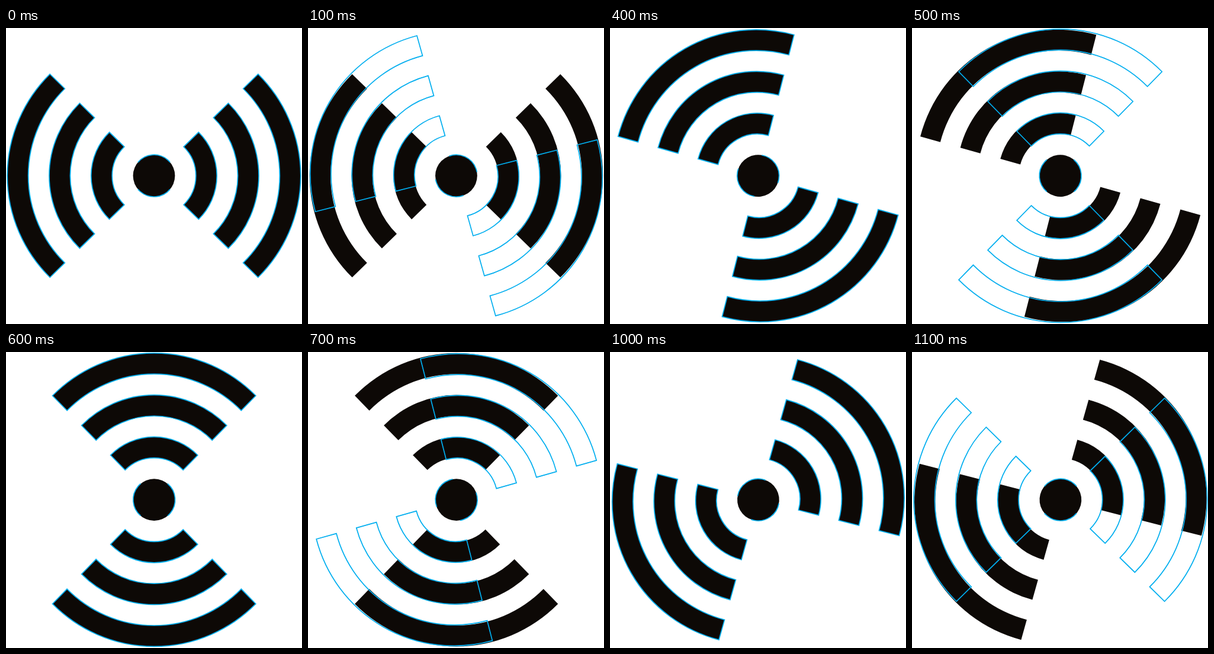
An HTML page with a canvas for the animation above (1.2 s loop, 500 px wide and 500 px high).

```html
<!DOCTYPE html>
<html lang="en">
<head>
<meta charset="utf-8">
<title>Rotating signal</title>
<style>
  html, body { margin: 0; width: 100%; height: 100%; overflow: hidden; background: #fff; }
  canvas { display: block; width: 500px; height: 500px; }
</style>
</head>
<body>
<canvas id="stage" width="500" height="500"></canvas>
<script>
const ctx = document.getElementById('stage').getContext('2d');
const LOOP = 1200, STEP = 100;
const UNIT = 35.4;                  // width of one band and of one gap
const SQUASH = 0.983;               // the bands are slightly flattened
const HALF = 44.8 * Math.PI / 180;  // half the angle of a band
const CAP = 50 * Math.PI / 180;     // half the angle of the dot's outline

const bands = new Path2D();
for (const mid of [0, Math.PI]) {
  for (const n of [2, 4, 6]) {
    const band = new Path2D();
    const edge = (r, from, to, back) =>
      band.ellipse(0, 0, r, r * SQUASH, 0, mid + from, mid + to, back);
    edge((n + 1) * UNIT, -HALF, HALF, false);
    edge(n * UNIT, HALF, -HALF, true);
    band.closePath();
    bands.addPath(band);
  }
}

const dot = new Path2D();
dot.arc(0, 0, UNIT, 0, Math.PI * 2);

const dotLine = new Path2D();
for (const mid of [-Math.PI / 2, Math.PI / 2]) {
  const arc = new Path2D();
  arc.arc(0, 0, UNIT, mid - CAP, mid + CAP);
  dotLine.addPath(arc);
}

function pose(turn, x, paint) {
  ctx.save();
  ctx.translate(x, 249.6);
  ctx.rotate(turn * Math.PI / 6);
  paint();
  ctx.restore();
}

function draw(time) {
  const step = Math.floor((time % LOOP) / STEP);
  // Slow drift to the right, with a nudge while the outline leads.
  const x = 250 + step * 0.04 + (step % 2) * 0.4;
  ctx.fillStyle = '#fff';
  ctx.fillRect(0, 0, 500, 500);
  pose(Math.floor(step / 2), x, () => {
    ctx.fillStyle = '#0d0906';
    ctx.fill(bands);
    ctx.fill(dot);
  });
  // The outline turns one step ahead of the fill.
  pose(Math.ceil(step / 2), x, () => {
    ctx.strokeStyle = '#00aeef';
    ctx.lineWidth = 1.7;
    ctx.stroke(bands);
    ctx.stroke(dotLine);
  });
}

const start = performance.now();
function tick() {
  draw(performance.now() - start);
  requestAnimationFrame(tick);
}
tick();
</script>
</body>
</html>
```
